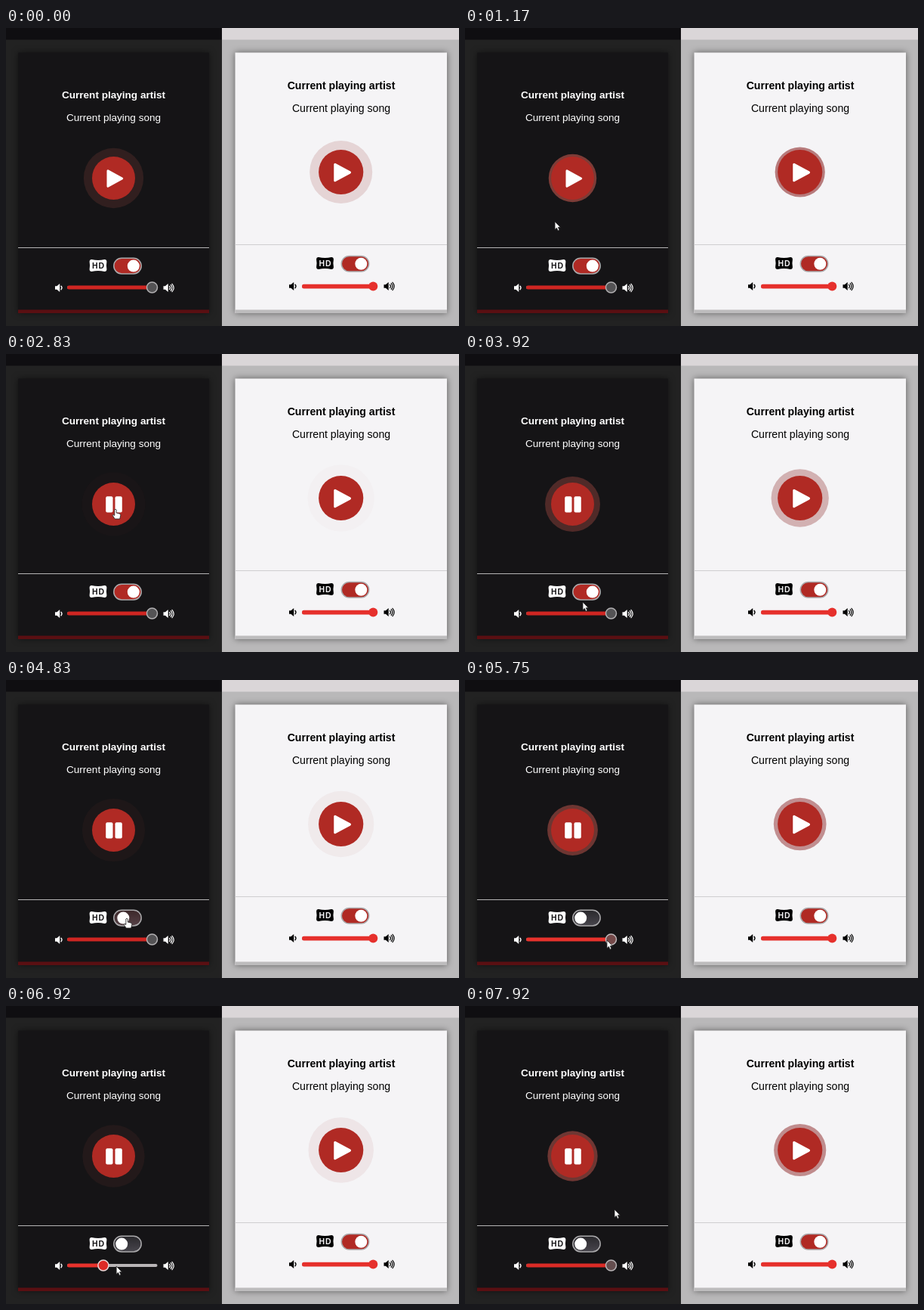
These frames come from a looping animation (600 by 394 pixels, 8 s). An HTML page:

```html
<!DOCTYPE html>
<html lang="en">
<head>
<meta charset="utf-8">
<title>Radio player, dark and light</title>
<style>
  html, body { margin: 0; width: 100%; height: 100%; overflow: hidden; background: #222; }
  svg { display: block; width: 600px; height: 394px; }
  text { font-family: "Liberation Sans", Arial, sans-serif; text-anchor: middle; }
  .shadow { filter: drop-shadow(0 0 4px rgba(0, 0, 0, .5)); }
</style>
</head>
<body>
<svg viewBox="0 0 600 394">
  <defs>
    <linearGradient id="off" x2="0" y2="1">
      <stop stop-color="#29282c"/><stop offset="1" stop-color="#48464d"/>
    </linearGradient>
    <path id="play" d="M-7.5-10.2 L11.2 0 L-7.5 10.2Z" fill="#fff" stroke="#fff" stroke-width="3" stroke-linejoin="round"/>
    <path id="badge" d="M-8.5-8 Q0-5.8 8.5-8 Q11.4-8 11.4-5 Q10.4 0 11.4 5 Q11.4 8 8.5 8 Q0 5.8-8.5 8 Q-11.4 8-11.4 5 Q-10.4 0-11.4-5 Q-11.4-8-8.5-8Z"/>
    <path id="speaker" d="M-5-2.3 h2.4 L1.2-5.4 V5.4 L-2.6 2.3 H-5Z"/>
    <path id="wave" d="M3-2.2 Q5 0 3 2.2" fill="none" stroke-width="1.3" stroke-linecap="round"/>
    <path id="waves" d="M3-2.2 Q5 0 3 2.2 M4.8-3.8 Q8 0 4.8 3.8 M6.5-5.2 Q10.8 0 6.5 5.2" fill="none" stroke-width="1.2" stroke-linecap="round"/>
  </defs>

  <rect width="286" height="394" fill="#222"/>
  <rect width="286" height="15.5" fill="#0f0e11"/>
  <rect x="286" width="314" height="394" fill="#b9b8b9"/>
  <rect x="286" width="314" height="15.5" fill="#dad6d8"/>
  <g id="panels"></g>
  <g id="cursor" stroke="#222" stroke-width=".8" stroke-linejoin="round" fill="#fff">
    <path id="arrow" d="M0 0 V10.5 L2.4 8.4 L4.1 12.2 L6 11.3 L4.3 7.7 H7.4Z"/>
    <path id="hand" d="M-1.2 1 Q0-.8 1.2 1 V5 L5.8 6.2 Q7 6.8 6.7 8.6 L5.7 13 H-.8 L-4 8.2 Q-3.5 6.8-1.2 8.4Z"/>
  </g>
</svg>
<script>
const LOOP = 8000;
const RED = '#b02a24';
const $ = id => document.getElementById(id);
const clamp = (v, lo, hi) => Math.min(hi, Math.max(lo, v));
const ramp = (t, start, length) => clamp((t - start) / length, 0, 1);
const smooth = u => u * u * (3 - 2 * u);
const mix = (a, b, u) => a + (b - a) * u;
const rgb = (a, b, u) => `rgb(${a.map((v, i) => Math.round(mix(v, b[i], u)))})`;

const dark = {
  id: 'dark', x: 16, w: 253, bg: '#151416', strip: '#5a0f12', ink: '#fff', paper: '#151416',
  cx: 142.5, title: 93, song: 122.5, font: 13.57, button: [142.5, 198.5, 28.5], scale: 1,
  ring: '215,95,85', spread: 14, rule: [290.5, '#b5b4b5'], badge: [122, 314], toggle: [142.8, 304.3],
  low: [70, 343.5], high: [213.5, 343.5], track: [81, 200.5, 343, 5], thumb: 193.5
};
const light = {
  id: 'light', x: 303.5, w: 280.5, bg: '#f5f4f6', strip: '#bdbcbd', ink: '#000', paper: '#f5f4f6',
  cx: 444, title: 81, song: 111, font: 14.12, button: [443.7, 190.5, 29.6], scale: 1.05,
  ring: '131,21,21', spread: 15, rule: [286.5, '#cfced0'], badge: [422.5, 311], toggle: [444.3, 301.5],
  low: [380, 341.5], high: [505.5, 341.5], track: [392, 492, 341.6, 5.6], thumb: 486.3
};

function panel(p) {
  const [bx, by, r] = p.button, [tx, ty] = p.toggle, [x0, x1, y, h] = p.track;
  const use = (id, [x, y]) => `<use href="#${id}" x="${x}" y="${y}" fill="${p.ink}" stroke="${p.ink}"/>`;
  const shape = (id, [x, y]) => `<use href="#${id}" x="${x}" y="${y}" fill="${p.ink}"/>`;
  return `
    <rect class="shadow" x="${p.x}" y="32.5" width="${p.w}" height="344.5" fill="${p.bg}"/>
    <rect x="${p.x}" y="372.5" width="${p.w}" height="4.5" fill="${p.strip}"/>
    <text x="${p.cx}" y="${p.title}" font-size="${p.font}" font-weight="700" fill="${p.ink}">Current playing artist</text>
    <text x="${p.cx}" y="${p.song}" font-size="${p.font}" fill="${p.ink}">Current playing song</text>
    <circle id="${p.id}-ring" cx="${bx}" cy="${by}"/>
    <circle cx="${bx}" cy="${by}" r="${r}" fill="${RED}"/>
    <use id="${p.id}-play" href="#play" transform="translate(${bx} ${by + .5}) scale(${p.scale})"/>
    <g id="${p.id}-pause" fill="#fff" visibility="hidden">
      <rect x="${bx - 10.3}" y="${by - 10.3}" width="9.3" height="21.4" rx="2"/>
      <rect x="${bx + 2}" y="${by - 10.3}" width="9.3" height="21.4" rx="2"/>
    </g>
    <path d="M${p.x} ${p.rule[0]} h${p.w}" stroke="${p.rule[1]}"/>
    ${shape('badge', p.badge)}
    <text x="${p.badge[0] + .4}" y="${p.badge[1] + 3.8}" font-size="10.5" font-weight="700" letter-spacing=".8" fill="${p.paper}">HD</text>
    <rect x="${tx}" y="${ty}" width="36.4" height="20.6" rx="10.3" fill="url(#off)"/>
    <rect id="${p.id}-on" x="${tx}" y="${ty}" width="36.4" height="20.6" rx="10.3" fill="${RED}"/>
    <rect x="${tx}" y="${ty}" width="36.4" height="20.6" rx="10.3" fill="none" stroke="#aaa9ab" stroke-width="1.5"/>
    <circle id="${p.id}-knob" cx="${tx + 26}" cy="${ty + 10.3}" r="8" fill="#fff"/>
    ${shape('speaker', p.low)}${use('wave', p.low)}
    ${shape('speaker', p.high)}${use('waves', p.high)}
    <rect x="${x0}" y="${y - h / 2 + .4}" width="${x1 - x0}" height="${h - .8}" rx="2" fill="#b9b5b7"/>
    <rect id="${p.id}-fill" x="${x0}" y="${y - h / 2}" width="${p.thumb - x0}" height="${h}" rx="2.5" fill="#e6302c"/>
    <circle id="${p.id}-thumb" cx="${p.thumb}" cy="${y}" r="6" fill="#e6302c"/>`;
}
$('panels').innerHTML = panel(dark) + panel(light);
$('dark-thumb').setAttribute('r', 7);
$('dark-thumb').setAttribute('stroke-width', 1.5);

// Pointer stops: time, x, y
const stops = [
  [920, 68, 366], [1170, 119, 256], [1600, 144, 206], [2830, 145, 205], [3050, 146, 215],
  [3330, 150, 291], [3920, 156, 328], [4300, 160, 315], [4950, 160, 315], [5500, 184, 341],
  [5750, 188, 344], [5900, 191, 344], [6500, 103, 344], [6700, 108, 344], [6920, 146, 344],
  [7250, 194, 344], [7550, 196, 340], [7800, 198, 275], [7920, 198, 269], [8000, 198, 268]
];
function pointer(t) {
  const i = clamp(stops.findIndex(s => s[0] > t), 1, stops.length - 1);
  const [a, b] = [stops[i - 1], stops[i]];
  const u = ramp(t, a[0], b[0] - a[0]);
  return [mix(a[1], b[1], u), mix(a[2], b[2], u)];
}

function pulse(p, t) {
  const u = ((t + 1353) % 2200) / 2200;
  const eased = 1 - (1 - u) ** 1.66;
  const ring = $(p.id + '-ring');
  ring.setAttribute('r', p.button[2] + p.spread * eased);
  ring.setAttribute('fill', `rgba(${p.ring},${.7 * (1 - eased)})`);
}

function draw(t) {
  pulse(dark, t);
  pulse(light, t);

  const playing = t >= 2050;
  $('dark-play').setAttribute('visibility', playing ? 'hidden' : 'visible');
  $('dark-pause').setAttribute('visibility', playing ? 'visible' : 'hidden');

  const off = smooth(ramp(t, 4600, 300));
  $('dark-on').setAttribute('opacity', 1 - off);
  $('dark-knob').setAttribute('cx', dark.toggle[0] + mix(26, 10.4, off));

  // The thumb trails the pointer while dragged
  const thumb = t < 5850 ? dark.thumb : clamp(pointer(t - 100)[0], 88, dark.thumb);
  const hover = ramp(t, 5680, 300) * (1 - ramp(t, 7640, 320));
  const bright = ramp(t, 5600, 150) * (1 - ramp(t, 7640, 500));
  $('dark-fill').setAttribute('width', thumb - dark.track[0]);
  $('dark-fill').setAttribute('fill', rgb([207, 38, 34], [232, 50, 44], bright));
  $('dark-thumb').setAttribute('cx', thumb);
  $('dark-thumb').setAttribute('fill', rgb([84, 83, 85], [222, 43, 38], hover));
  $('dark-thumb').setAttribute('stroke', rgb([178, 176, 178], [235, 215, 215], hover));

  const [x, y] = pointer(t);
  const onButton = Math.hypot(x - dark.button[0], y - dark.button[1]) < dark.button[2];
  const onToggle = x > 142 && x < 180 && y > 304 && y < 325;
  const hand = onButton || onToggle;
  $('cursor').setAttribute('visibility', t < 920 ? 'hidden' : 'visible');
  $('cursor').setAttribute('transform', `translate(${x} ${y})`);
  $('arrow').style.display = hand ? 'none' : '';
  $('hand').style.display = hand ? '' : 'none';
}

const start = performance.now();
function frame() {
  draw((performance.now() - start) % LOOP);
  requestAnimationFrame(frame);
}
frame();
</script>
</body>
</html>
```
